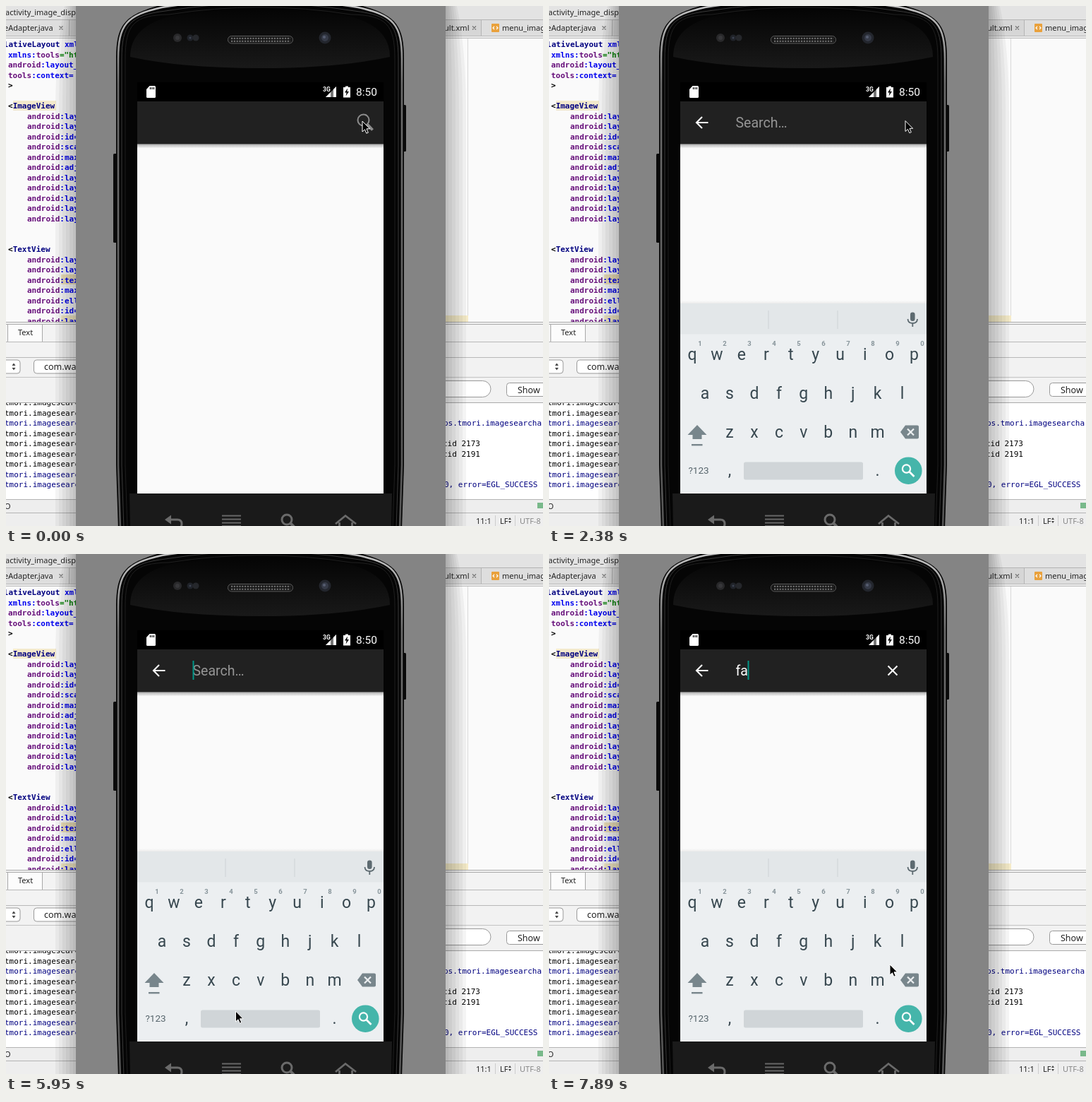
Recreate the animation shown at these times as an HTML page. Size 761 by 736 pixels, loop 8 s.

```html
<!DOCTYPE html>
<html>
<head>
<meta charset="utf-8">
<style>
html, body { margin: 0; width: 100%; height: 100%; overflow: hidden; background: #848484; }
svg { display: block; width: 761px; height: 736px; }
text { white-space: pre; }
.mono { font: 11px "DejaVu Sans Mono", monospace; }
.b { font-weight: bold; }
.ui { font: 11px "Noto Sans", sans-serif; fill: #222; }
.rb { font-family: Roboto, sans-serif; }
</style>
</head>
<body>
<svg id="stage" viewBox="0 0 761 736" xmlns="http://www.w3.org/2000/svg"></svg>
<script>
const rect = (x, y, w, h, fill, more = '') =>
  `<rect x="${x}" y="${y}" width="${w}" height="${h}" fill="${fill}" ${more}/>`;
const path = (d, fill, more = '') => `<path d="${d}" fill="${fill}" ${more}/>`;
const line = (d, color, w = 1, more = '') =>
  path(d, 'none', `stroke="${color}" stroke-width="${w}" ${more}`);
const circle = (x, y, r, fill, more = '') =>
  `<circle cx="${x}" cy="${y}" r="${r}" fill="${fill}" ${more}/>`;
const text = (x, y, s, cls, more = '') => `<text x="${x}" y="${y}" class="${cls}" ${more}>${s}</text>`;
const span = (color, s) => `<tspan fill="${color}">${s}</tspan>`;
const group = (id, body, more = '') => `<g id="${id}" ${more}>${body}</g>`;

const PITCH = 14.5;
const NAVY = '#000080', BLUE = '#0000f0', PLUM = '#660e7a', GREEN = '#008000';

function editor() {
  let s = rect(0, 0, 761, 736, '#fafafa') + rect(0, 0, 761, 20, '#e3e3e3') +
    rect(0, 20, 761, 22, '#d6d6d6') + rect(0, 20, 89, 22, '#dedede') +
    rect(673, 20, 88, 22, '#dedede') +
    line('M0 19.5H761M89.5 20V42M673.5 20V42', '#b4b4b4') +
    rect(0, 42, 761, 4, '#ededed') + line('M0 42.5H761M0 45.5H761', '#b9b9b9') +
    line('M654.5 46V447', '#d9d9d9');
  s += text(-1, 13, 'activity_image_disp', 'ui') + text(-3, 35, 'eAdapter.java', 'ui') +
    text(621, 35, 'ult.xml', 'ui') + text(703, 35, 'menu_imag', 'ui') +
    line('M75.5 28.5l5 5m0-5l-5 5M661 28.5l5 5m0-5l-5 5', '#777', 1.3) +
    rect(688, 25, 11, 12, '#e9a13c', 'rx="1"') +
    line('M692 29l-2 2 2 2M695 29l2 2-2 2', '#fff', 1.2);

  s += rect(10, 134, 61, 14, '#f3e9cc') + rect(78, 380, 22, 14, '#f0e4bc') +
    rect(78, 438, 22, 9, '#f5ebc8') + rect(623, 438, 32, 9, '#f5ebc8');
  const code = (x, row, body) => { s += text(x, 58 + row * PITCH, body, 'mono b'); };
  const attr = (x, row, ns, rest) => code(x, row, span(PLUM, ns) + span(BLUE, rest));
  code(-23, 0, span('#000', '&lt;') + span(NAVY, 'RelativeLayout ') + span(BLUE, 'xmlns'));
  code(3, 1, span(BLUE, 'xmlns:') + span(PLUM, 'tools') + span(GREEN, '="ht'));
  attr(3, 2, 'android', ':layout_w');
  attr(3, 3, 'tools', ':context=');
  code(3, 4, span('#000', '&gt;'));
  const view = (row, name, attrs) => {
    code(3, row, span('#000', '&lt;') + span(NAVY, name));
    attrs.split(' ').forEach((a, i) => attr(30, row + 1 + i, 'android', ':' + a));
  };
  view(6, 'ImageView', 'layo layo id=" scal maxH adju layo layo layo layo layo');
  view(20, 'TextView', 'layo layo text maxL elli id=" layo');

  // panels below the editor
  s += rect(0, 447, 761, 51, '#f3f3f3') + rect(2, 450, 50, 25, '#fcfcfc') +
    line('M0 447.5H761M0 450.5H761M2.5 450V475M51.5 450V475', '#a9a9a9') +
    line('M0 475.5H761M0 497.5H761', '#b8b8b8') + text(17, 465.5, 'Text', 'ui') +
    rect(0, 498, 761, 64, '#f2f2f2') + line('M0 525.5H761', '#c4c4c4') +
    rect(-20, 501, 40, 19, '#fff', 'rx="4" stroke="#999"') +
    path('M8.5 509l2.5-3.5 2.5 3.5zM8.5 512l2.5 3.5 2.5-3.5z', '#444') +
    rect(39.5, 501, 90, 19, '#fff', 'rx="4" stroke="#999"') +
    text(54, 515, 'com.wa', 'ui', 'style="font-size:12.5px"') +
    rect(560, 530.5, 127, 23, '#fff', 'rx="11.5" stroke="#999"') +
    rect(709.5, 533.5, 70, 19, '#fff', 'rx="4" stroke="#999"') +
    text(725, 547.5, 'Show', 'ui', 'style="font-size:12.5px"');

  const log = (x, row, body, color) => {
    s += text(x, 565 + row * PITCH, body, 'mono', `fill="${color}"`);
  };
  s += rect(0, 562, 761, 136, '#fff');
  [...'kkbkkkkbb'].forEach((c, i) => log(-2, i, 'tmori.imagesearch', c === 'b' ? NAVY : '#000'));
  log(620, 2, 'ps.tmori.imagesearcha', NAVY);
  log(619, 4, 'tid 2173', '#000');
  log(619, 5, 'tid 2191', '#000');
  log(621, 8, '0, error=EGL_SUCCESS', NAVY);
  s += rect(0, 556, 761, 6, '#f2f2f2') + line('M0 561.5H761', '#aaa') +
    rect(0, 698, 761, 38, '#eeeeee') + line('M0 698.5H761M0 717.5H761', '#b4b4b4') +
    text(-2, 712, 'O', 'ui') + rect(753, 703, 8, 8, '#79b98a') +
    text(666, 733, '11:1', 'ui') + text(700, 733, 'LF', 'ui') +
    path('M712 727l2-3 2 3zM712 729l2 3 2-3z', '#444') +
    text(728, 733, 'UTF-8', 'ui', 'style="fill:#888"') +
    line('M693.5 721V736M721.5 721V736', '#ccc');

  // stepped window shadow
  [29, 24, 19, 14, 9, 4].forEach(w => {
    const k = w * .55;
    s += path(`M${99 - k} 0Q${99 - w} 60 ${99 - w} 150V736H99V0z`, '#000', 'opacity=".045"') +
      path(`M${623 + k} 0Q${623 + w} 60 ${623 + w} 150V736H623V0z`, '#000', 'opacity=".045"');
  });
  return s + rect(99, 0, 524, 736, '#848484');
}

const shell = i => {
  const l = 156 + i, r = 564 - i;
  return `M${l + 3} 740L${l} 650V75C${l} 26 ${l + 12} 13 ${l + 62} ${i - 1}Q360 ${i * 1.2 - 24} ${r - 62} ${i - 1}` +
    `C${r - 12} 13 ${r} 26 ${r} 75V650L${r - 3} 740`;
};

function phone() {
  let s = rect(152, 209, 6, 126, '#0a0a0a', 'rx="1.5"') + rect(562, 140, 5, 66, '#0a0a0a', 'rx="1.5"') +
    path(shell(0), '#050505') + line(shell(3), 'url(#rim)', 2.6) +
    line(shell(8), '#3a3a3a', 1) + line(shell(13), '#1f1f1f', 1) +
    path('M176 72Q176 28 236 14Q360 -2 484 14Q544 28 544 72Q470 88 360 88Q250 88 176 72z', 'url(#gloss)');
  s += circle(243, 45, 6, '#29292b') + circle(243, 45, 3, '#37373a') +
    circle(261, 45, 4.5, '#202329') + circle(269, 45, 4.5, '#25272b') + circle(261, 45, 1.5, '#3c4250') +
    circle(452, 45, 8.5, '#23262d') + circle(452, 45, 5, '#363b48') + circle(451, 44, 2, '#565d70') +
    rect(314.5, 42.5, 92, 10.5, '#171717', 'rx="5" stroke="#5b5b5b"') +
    line('M319 45.8H403M319 49.8H403', '#6b6b6b', 2.2, 'stroke-dasharray="2.2 1.6"');
  s += path('M175 690H547L546 736H176z', '#1a1a1a');
  // hardware keys
  s += line('M231 727H243Q249 727 249 733Q249 739 243 739H236', '#6a6a6a', 3) +
    path('M225 727l9-6.5v13z', '#6a6a6a') +
    line('M306 721.5H333M306 726.5H333M306 731.5H333M306 736H333', '#666', 2.2) +
    circle(398, 727, 7, 'none', 'stroke="#6a6a6a" stroke-width="3"') +
    line('M403 732l7 7', '#6a6a6a', 4) +
    line('M467 733L481 721.5L496 733M472.5 731V740M490.5 731V740', '#6a6a6a', 2.8);
  // status bar
  s += rect(186, 108, 349, 27, '#000') +
    path('M203.5 113H210.5Q212 113 212 114.5V128.5Q212 130 210.5 130H200.5Q199 130 199 128.5V118z', '#fff') +
    line('M204.5 115v3M207 115v3M209.5 115v3', '#000', 1.2) +
    text(449, 121, '3G', 'rb b', 'fill="#fff" font-size="8.5"') +
    path('M468 114V129H453z', '#777') + path('M468 114V129H453L460 122V129H464V118z', '#fff') +
    path('M478 115H481V113.5H485V115H488V129.5H478z', '#fff') + path('M484 116.5l-4 6h2.6l-1 5 4.4-6.5h-2.6z', '#000') +
    text(496, 127, '8:50', 'rb', 'fill="#fff" font-size="15.5"');
  return s + rect(186, 135, 349, 61, '#212121') + rect(186, 195.5, 349, 494.5, '#fafafa') +
    rect(186, 195.5, 349, 6, 'url(#drop)');
}

function keyboard() {
  const ink = 'fill="#37474f" text-anchor="middle"', icon = '#78868c';
  let s = rect(186, 417, 349, 4, 'url(#lift)') + rect(186, 421, 349, 270, '#eceff1') +
    rect(186, 421, 349, 43.5, '#e3e7e9') + line('M311 431V457M409 431V457', '#cdd2d5');
  const row = (keys, x, y) => [...keys].forEach((k, i) => {
    s += text((x + i * 34.95).toFixed(1), y, k, 'rb', ink + ' font-size="23"');
  });
  row('qwertyuiop', 203, 501);
  row('asdfghjkl', 221, 556);
  row('zxcvbnm', 256, 611);
  [...'1234567890'].forEach((d, i) => {
    s += text(214 + i * 35, 480.5, d, 'rb b', 'fill="#87949a" text-anchor="middle" font-size="9.5"');
  });
  s += rect(512, 433.5, 6.6, 12.5, '#5d6a70', 'rx="3.3"') +
    line('M508.5 443Q508.5 449 515.3 449Q522 449 522 443M515.3 449V454', '#5d6a70', 1.8) +
    path('M210 593L223.5 607H216.5V613H203.5V607H196.5z', icon) + rect(202, 620, 15.5, 2.4, icon) +
    path('M498 603L505 593.5H522Q524 593.5 524 595.5V610.5Q524 612.5 522 612.5H505z', icon) +
    line('M508 598.5l9 9m0-9l-9 9', '#eceff1', 2.2) +
    text(212, 662, '?123', 'rb', 'fill="#56646b" text-anchor="middle" font-size="13.5"') +
    text(256, 665, ',', 'rb', ink + ' font-size="23"') + text(465.5, 665, '.', 'rb', ink + ' font-size="23"') +
    rect(276, 645.5, 169, 25, '#d0d5d8', 'rx="2.5"') + circle(509.3, 657.7, 19.3, '#45b5aa') +
    circle(506.5, 655, 5.6, 'none', 'stroke="#fff" stroke-width="2.2"') + line('M510.5 659l7 7', '#fff', 2.6);
  return s;
}

const stop = (o, c, a = 1) => `<stop offset="${o}" stop-color="${c}" stop-opacity="${a}"/>`;
const fade = (id, stops) => `<linearGradient id="${id}" x1="0" y1="0" x2="0" y2="1">${stops}</linearGradient>`;
const field = 'font-size="19.5"';

document.getElementById('stage').innerHTML =
  '<defs>' + fade('rim', stop(0, '#c8c8c8') + stop(.06, '#aaa') + stop(.16, '#6c6c6c') + stop(1, '#555')) +
  fade('gloss', stop(0, '#050505') + stop(1, '#191919')) +
  fade('drop', stop(0, '#000', .3) + stop(1, '#000', 0)) +
  fade('lift', stop(0, '#000', 0) + stop(1, '#000', .06)) +
  '<clipPath id="screen"><rect x="186" y="135" width="349" height="554.5"/></clipPath></defs>' +
  editor() + phone() +
  group('lens', circle(506.5, 161.5, 8, 'none', 'stroke="#8d8d8d" stroke-width="2"') +
    line('M512 167.5l7.5 8', '#8d8d8d', 4)) +
  group('bar', line('M225.5 165H209.5M217 157l-8 8 8 8', '#fff', 2.1) +
    text(264.5, 172, 'Search…', 'rb', `id="hint" fill="#959595" ${field}`) +
    text(264.5, 172, '', 'rb', `id="typed" fill="#fff" ${field}`) +
    line('M480.5 158.5l13 13m0-13l-13 13', '#fff', 2.1, 'id="clear"') +
    rect(0, 151, 2, 27, '#009688', 'id="caret"')) +
  `<g clip-path="url(#screen)">${group('keys', keyboard())}</g>` +
  path('M0 0V15L3.5 11.8L5.8 17.2L8.3 16.2L6 10.8H10.6z', '#000',
    'id="pointer" stroke="#fff" stroke-width="1"');

const $ = id => document.getElementById(id);
const show = (id, on) => $(id).setAttribute('visibility', on ? 'visible' : 'hidden');

// each entry: start time, then its values, held until the next one
const moves = [
  [0, 505, 163], [140, 505, 162.5], [5510, 488, 235], [5660, 425, 430], [5800, 345, 610],
  [5950, 325.5, 647], [6100, 323, 605], [6250, 324, 562], [6400, 325, 551],
  [6850, 300, 555], [6990, 245, 559], [7140, 208, 554], [7290, 213.5, 550.5],
  [7740, 370, 577], [7890, 483, 581]
];
const slides = [[0, 270, 0], [1040, 80, .2], [1180, 36, .6], [1330, 9, .9], [1480, 0, 1]];
const words = [[0, ''], [6700, 'f'], [7590, 'fa']];
const blinks = [890, 1480, 1930, 2380, 2970, 3420, 4010, 4460, 4910, 5360, 5950, 6400, 6700, 7290, 7590];
const at = (list, t) => list.filter(k => k[0] <= t).pop();
const LOOP = 8000;

function draw(t) {
  const [, x, y] = at(moves, t), [, drop, alpha] = at(slides, t), word = at(words, t)[1];
  const open = t >= 890;
  show('lens', !open);
  show('bar', open);
  show('hint', open && !word);
  show('clear', open && word);
  show('caret', open && blinks.filter(b => b <= t).length % 2);
  $('typed').textContent = word;
  $('caret').setAttribute('x', [264.5, 271, 281.5][word.length]);
  $('keys').setAttribute('transform', `translate(0 ${drop})`);
  $('keys').setAttribute('opacity', alpha);
  $('pointer').setAttribute('transform', `translate(${x} ${y})`);
}

const start = performance.now();
function tick() {
  draw((performance.now() - start) % LOOP);
  requestAnimationFrame(tick);
}
draw(0);
requestAnimationFrame(tick);
</script>
</body>
</html>
```
